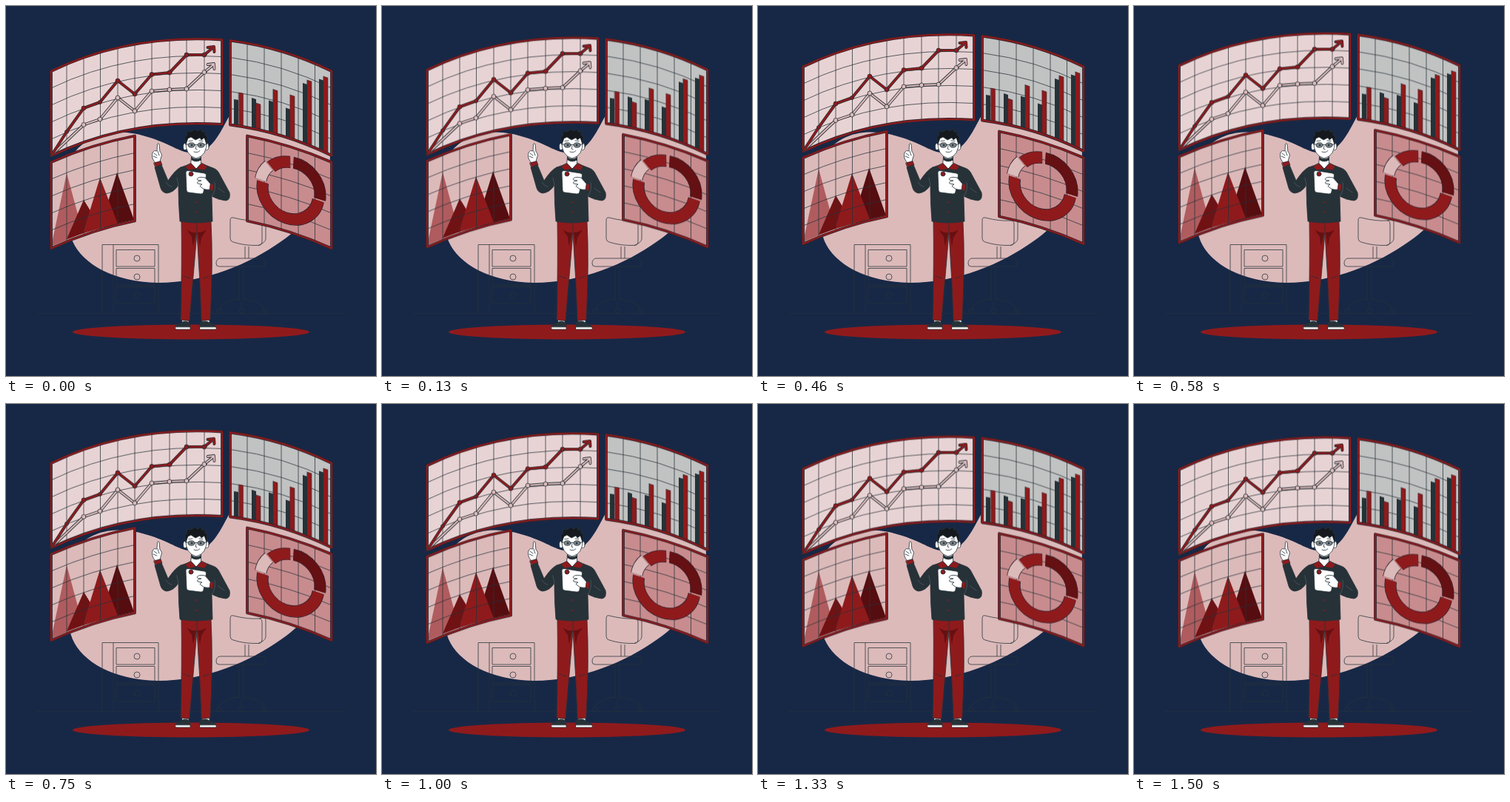
Write an HTML page without scripts that moves like this. It is 500 by 500 pixels and loops after 1540 ms.

```html
<!DOCTYPE html>
<html lang="en">
<head>
<meta charset="utf-8">
<title>Presenter with floating charts</title>
<style>
  html, body { margin: 0; height: 100%; overflow: hidden; background: #172846; }
  svg { display: block; width: 100vw; height: 100vh; }
  .red { fill: #8f1a1c; }
  .dark { fill: #263238; }
  .skin { fill: #fff; }
  .ink { stroke: #263238; stroke-width: .8; stroke-linejoin: round; stroke-linecap: round; }
  .line { fill: none; }
  .furniture, .grid { fill: none; stroke: #263238; stroke-width: .75; }
  .edge { fill: none; stroke: #33252f; stroke-width: 3.8; stroke-linejoin: round; }
  .rim { fill: none; stroke: #8f1a1c; stroke-width: 2; stroke-linejoin: round; }
  .series { fill: none; stroke-linejoin: round; stroke-linecap: round; }
  .ring circle { fill: none; stroke: var(--edge, var(--c)); stroke-width: var(--w, 14.6); }
  .floating { animation: float 1540ms linear infinite; }
  @keyframes float {
    0%, 100% { transform: translateY(0); }
    44.8% { transform: translateY(-9px); }
    93.5% { transform: translateY(1px); }
  }
</style>
</head>
<body>
<svg viewBox="0 0 500 500">
  <defs>
    <path id="trend-panel" d="M61 88q104-50.5 231-42.5v114.500q-127-8-231 42.500z"/>
    <path id="bar-panel" d="M303 46.5q72 9.5 137 41.5v114q-65-32-137-41.5z"/>
    <path id="peak-panel" d="M61 211q54-24 113-35.5v115q-59 12-113 37z"/>
    <path id="ring-panel" d="M326 175.5q59 11.5 114 35.5v116.500q-55-25-114-37z"/>
    <clipPath id="trend-clip"><use href="#trend-panel"/></clipPath>
    <clipPath id="bar-clip"><use href="#bar-panel"/></clipPath>
    <clipPath id="peak-clip"><use href="#peak-panel"/></clipPath>
    <clipPath id="ring-clip"><use href="#ring-panel"/></clipPath>

    <path id="trend" d="M62 201L82 170 105 138 127 130 151 101 174 119 197 92.5 221 90 244 66H268L280 56M272.500 56L281 55 281.500 62"/>
    <path id="trend-low" d="M62 201L105 160.5 127 153 151 124 174 142 197 115 221 113 244 112 268 89.5 280 79.5M272.500 79L281 78 281.500 85"/>
    <g id="ring" class="ring">
      <circle r="38" pathLength="360" stroke-dasharray="179 181" transform="rotate(10.5)" style="--c:#8f1a1c"/>
      <circle r="38" pathLength="360" stroke-dasharray="96 264" transform="translate(2 -1) rotate(-87)" style="--c:#651012"/>
      <circle r="38" pathLength="360" stroke-dasharray="43 317" transform="translate(0 -1) rotate(226.500)" style="--c:#8f1a1c"/>
      <circle r="38" pathLength="360" stroke-dasharray="36 324" transform="translate(-3 -2) rotate(190.500)" style="--c:#dcbaba"/>
    </g>
  </defs>

  <rect width="500" height="500" fill="#172846"/>
  <path fill="#dcbaba" d="M302 148C315 115 350 100 400 120C445 145 448 225 420 270C405 292 388 307 372 318C330 348 270 374 205 374C145 373 103 348 90 318C75 275 62 235 95 195C120 166 160 166 195 178C225 188 235 198 253 199C277 198 288 174 302 148z"/>

  <g class="furniture">
    <path d="M42 415.500H456" opacity=".7"/>
    <path d="M130 415V322.500H206V415M145 322.500V415M149 329.500H201V352H149zM149 354.500H201V377H149zM149 379.500H201V402H149z"/>
    <circle cx="177" cy="341" r="4"/>
    <circle cx="177" cy="366" r="4"/>
    <circle cx="177" cy="391" r="4"/>
    <path d="M307 286Q326 291 342 290 346 290 346 295V318Q346 323 341 323.500 322 324 307 319 303 318 303 314V290Q303 285 307 286zM342 290Q351 287 351 292V315Q350 320 341 323.500"/>
    <path d="M323 325V341M328 325V341M289 341H345Q350 341 350 346V352H288Q284 352 284 348 284 342 289 341zM315 352V398M321 352V398M315 396Q293 398 288 409M321 396Q344 398 349 409M318 398V410"/>
    <circle cx="288" cy="412" r="3"/>
    <circle cx="318" cy="412" r="3"/>
    <circle cx="349" cy="412" r="3"/>
  </g>

  <ellipse class="red" cx="250" cy="440.500" rx="160" ry="10"/>

  <g class="floating">
    <use href="#trend-panel" fill="#e8d3d4"/>
    <g clip-path="url(#trend-clip)">
      <path class="grid" d="M82 40V210M105 40V210M127.500 40V210M151 40V210M174 40V210M197 40V210M221 40V210M244 40V210M268 40V210M61 111q104-50.500 231-42.500M61 134q104-50.500 231-42.500M61 157q104-50.500 231-42.500M61 180q104-50.500 231-42.500"/>
    </g>
    <use href="#trend-panel" class="edge"/>
    <use href="#trend-panel" class="rim"/>
    <g class="series">
      <use href="#trend-low" stroke="#263238" stroke-width="3.800"/>
      <use href="#trend-low" stroke="#dcbaba" stroke-width="2.200"/>
      <use href="#trend" stroke="#263238" stroke-width="4"/>
      <use href="#trend" stroke="#8f1a1c" stroke-width="2.600"/>
    </g>
    <g class="ink" fill="#dcbaba">
      <circle cx="105" cy="160.500" r="3"/>
      <circle cx="127" cy="153" r="3"/>
      <circle cx="151" cy="124" r="3"/>
      <circle cx="174" cy="142" r="3"/>
      <circle cx="197" cy="115" r="3"/>
      <circle cx="221" cy="113" r="3"/>
      <circle cx="244" cy="112" r="3"/>
      <circle cx="268" cy="89.500" r="3"/>
    </g>
    <g class="ink red">
      <circle cx="82" cy="170" r="2.500"/>
      <circle cx="105" cy="138" r="3"/>
      <circle cx="127" cy="130" r="2.500"/>
      <circle cx="151" cy="101" r="3"/>
      <circle cx="174" cy="119" r="3"/>
      <circle cx="197" cy="92.500" r="3"/>
      <circle cx="221" cy="90" r="3"/>
      <circle cx="244" cy="66" r="3"/>
      <circle cx="268" cy="66" r="3"/>
    </g>

    <use href="#bar-panel" fill="#c1c2c2"/>
    <g clip-path="url(#bar-clip)">
      <path class="grid" d="M326 45V205M349 45V205M372 45V205M395 45V205M417.500 45V205M303 69.500q72 9.500 137 41.500M303 92.500q72 9.500 137 41.500M303 115.500q72 9.500 137 41.500M303 138.500q72 9.500 137 41.500"/>
      <path class="dark" d="M308 126l6 1V170h-6zM332 124l6 2V175h-6zM355 127.500l6 2V182h-6zM378 137.500l6 2V190h-6zM401 104l6 2V199h-6zM423 98.500l6 2V208h-6z"/>
      <path class="ink red" style="stroke-width:.5" d="M314.500 117l6 1V170h-6zM338 131l6 2V175h-6zM361 112.500l6 2V182h-6zM384 120l6 2V190h-6zM407 100l6 2V199h-6zM429 95l6 2V208h-6z"/>
    </g>
    <use href="#bar-panel" class="edge"/>
    <use href="#bar-panel" class="rim"/>

    <use href="#peak-panel" fill="#dcbaba"/>
    <g clip-path="url(#peak-clip)">
      <path fill="#b05c5e" d="M82 226L104 307 61 325z"/>
      <path fill="#701214" d="M105 262L128 299 82 315z"/>
      <path fill="#560d10" d="M150 225L173 289 127 300z"/>
      <path class="red" d="M127 232L151 294 104 307z"/>
      <path class="grid" d="M82 170V330M105 170V330M127.500 170V330M151 170V330M61 234q54-24 113-35.500M61 257q54-24 113-35.500M61 280q54-24 113-35.500M61 303q54-24 113-35.500"/>
    </g>
    <use href="#peak-panel" class="edge"/>
    <use href="#peak-panel" class="rim"/>

    <use href="#ring-panel" fill="#c88c8e"/>
    <g clip-path="url(#ring-clip)">
      <path class="grid" d="M349 170V330M372 170V330M395 170V330M417.500 170V330M326 198.500q59 11.500 114 35.500M326 221.500q59 11.500 114 35.500M326 244.500q59 11.500 114 35.500M326 267.500q59 11.500 114 35.500"/>
      <g transform="translate(384.500 250) skewY(9)">
        <use href="#ring" style="--edge:#33252f;--w:16.200"/>
        <use href="#ring"/>
      </g>
    </g>
    <use href="#ring-panel" class="edge"/>
    <use href="#ring-panel" class="rim"/>
  </g>

  <g class="ink">
    <!-- legs and shoes -->
    <path class="skin" d="M238 422h9v7h-9zM265 422h10v7h-10z"/>
    <path class="red" d="M237 291H277Q280 345 276 424.500L264 425.500Q262 365 258 307 253 365 248 425.500L236 424.500Q238 345 237 291z"/>
    <path fill="#651012" stroke="none" d="M244 302Q250 307 257 306L253 325 251 312zM259 306Q266 306 271 302L264 313 262 325z"/>
    <path class="line" d="M258 293V307M240 365L249 368M266 368L275 365"/>
    <path class="skin" d="M229 433H249V437H230Q228 436 229 433zM262 433H283Q285 435 284 437H262z"/>
    <path class="dark" d="M229 433.500Q231 430 237 428 241 424 248 428L249 433.500zM262 433.500V428Q270 424 275 428 281 430 284 433.500z"/>

    <!-- raised hand -->
    <path class="skin" d="M201 211Q196 205 198 198 200 194 204 196L204.500 187Q205.500 184 207 187L208 197Q212 200 209 206L208 212z"/>
    <path class="line" d="M200 199L204 202M199 203L204 205M205 196L207 202"/>
    <path class="red" d="M200 212L209 209.500 211 215 202 218z"/>

    <!-- jacket -->
    <path class="dark" d="M236 218L248 214H267L280 219Q286 221 289 228L302 252Q304 262 297 263 287 262 278 257L279 291Q257 295 235 291 233 268 233 242 227 252 217 253 211 252 209 246L201 218 210 214.500 219 236Q229 221 236 218z"/>
    <g class="line" style="stroke:#65707a;stroke-width:.5">
      <path d="M233 242L231 232M278 257Q284 250 282 238M216 238Q220 244 224 244M287 246L295 252"/>
    </g>
    <path class="skin" d="M251 203H263.500V213L257 220 250 213z"/>
    <path class="dark" d="M251 204.500Q257 209 263.500 204.500V208Q257 212 251 208z"/>
    <path class="red" d="M250 212.500L257 220 247 222 242 217zM264.500 212.500L257 220 268 222 272 217z"/>
    <g class="red" stroke="none">
      <circle cx="257" cy="265" r="1"/>
      <circle cx="257" cy="279" r="1"/>
    </g>

    <!-- tablet -->
    <path class="skin" d="M246 222.500L268 226Q271 226.500 270.500 229L267 251Q266.500 254.500 263 254L247 252Q244 251.500 244 249L243 225Q243 222 246 222.500z"/>
    <circle class="red" cx="250" cy="227" r="3"/>
    <path class="red" d="M277 239L281 242 279 251 274 247z"/>
    <path class="skin" d="M276 240L269 232Q260 230 258 234 258 236 264 236 257 237 259 240L265 241Q260 243 264 245 268 249 275 248z"/>

    <!-- head -->
    <ellipse class="skin" cx="242" cy="190" rx="2.500" ry="4.500"/>
    <ellipse class="skin" cx="271.500" cy="190" rx="2.500" ry="4.500"/>
    <path class="skin" d="M243 183Q242 202 257 206 272 202 271 183 270 173 257 173 244 173 243 183z"/>
    <path fill="#15191d" d="M243 187L242 178 245 173 244 169 250 170 256 166 258 169 266 166 264 170 271 170 268 173 272 177 271 187 268 178 264 181 262 178 256 181 250 177 246 179z"/>
    <g fill="#7d868b">
      <ellipse cx="250.500" cy="188" rx="4.500" ry="3.200"/>
      <ellipse cx="263.500" cy="188" rx="4.500" ry="3.200"/>
    </g>
    <path class="line" d="M255 187.500H259M243 187H246M268 187H271M257 189L256 193 258 193.500M254 197Q259 199 262 195.500M247 182.500L252 182M261 182L266 182.500"/>
    <circle class="dark" cx="251" cy="188" r="1"/>
    <circle class="dark" cx="263" cy="188" r="1"/>
  </g>
</svg>
</body>
</html>
```
